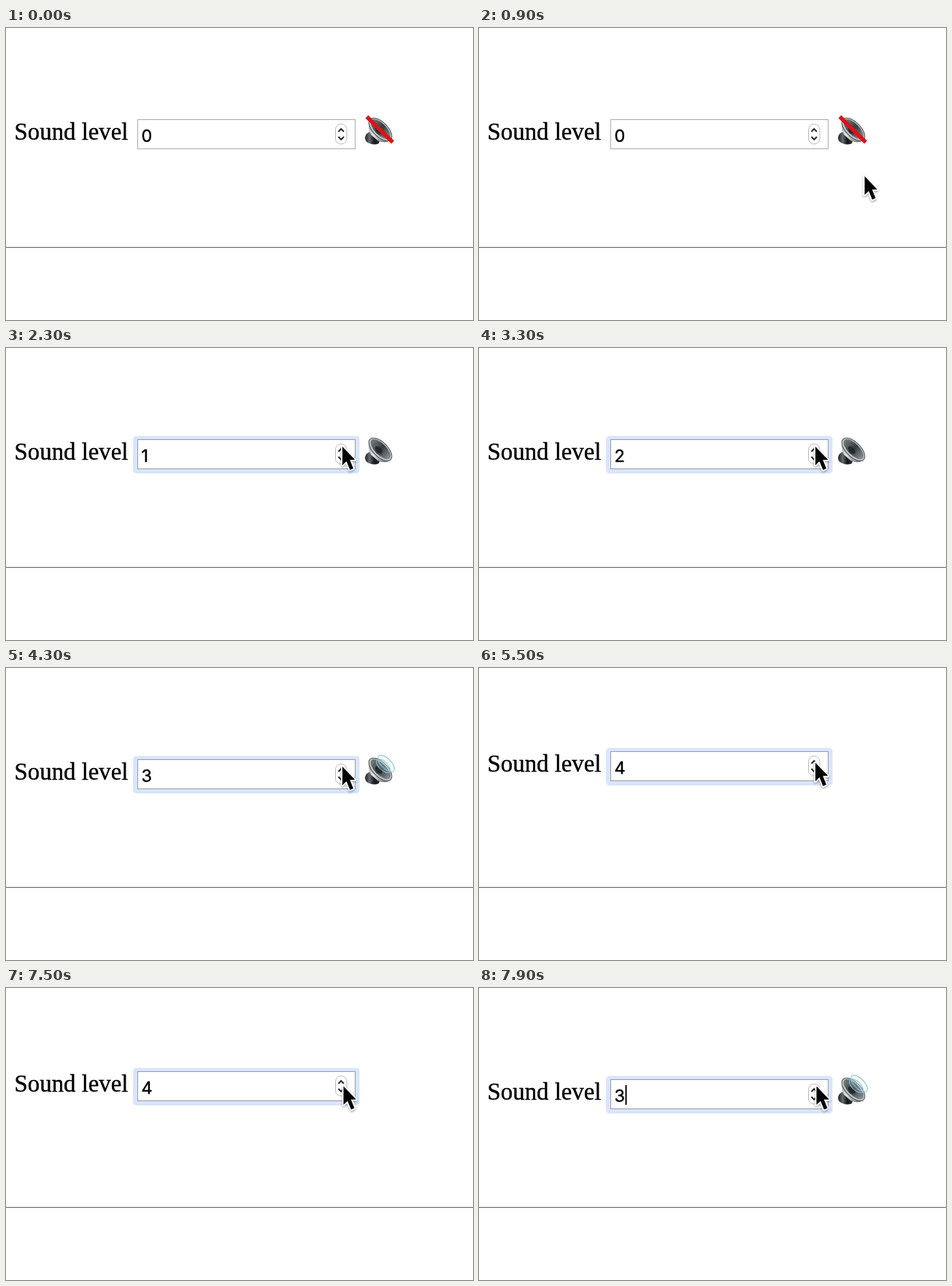
Write an HTML page that moves like this. It is 640x400 px and loops after 8000 ms.

```html
<!DOCTYPE html>
<html lang="en">
<head>
<meta charset="utf-8">
<title>Sound level</title>
<style>
  html, body { margin: 0; width: 100%; height: 100%; overflow: hidden; background: #fff; }
  svg { display: block; width: 640px; height: 400px; }
  text { stroke: #000; stroke-width: .4px; }
  .label { font: 32.8px "Liberation Serif", serif; }
  .digit { font: 23.5px Inter, sans-serif; }
</style>
</head>
<body>
<svg viewBox="0 0 640 400">
  <defs>
    <linearGradient id="metal" x1="0" y1="0" x2="1" y2="1">
      <stop offset="0" stop-color="#777"/>
      <stop offset=".45" stop-color="#e4e7e8"/>
      <stop offset="1" stop-color="#555a5d"/>
    </linearGradient>
    <linearGradient id="inside" x1="0" y1="0" x2="1" y2="0">
      <stop offset="0" stop-color="#777d80"/>
      <stop offset=".5" stop-color="#363a3d"/>
      <stop offset="1" stop-color="#8b9194"/>
    </linearGradient>
    <linearGradient id="magnet">
      <stop offset="0" stop-color="#222"/>
      <stop offset=".3" stop-color="#666b6e"/>
      <stop offset=".6" stop-color="#15181a"/>
      <stop offset="1" stop-color="#333"/>
    </linearGradient>
    <filter id="shadow" x="-50%" y="-50%" width="200%" height="200%">
      <feDropShadow dx="0" dy="1.5" stdDeviation="1.5" flood-opacity=".4"/>
    </filter>
  </defs>

  <path d="M0 300.5H640" stroke="#5c5c5c"/>

  <g id="form">
    <text class="label" x="11.6" y="153.4">Sound level</text>
    <rect id="ring" x="174" y="120.5" width="310.5" height="51.5" rx="5" fill="#dae5fb"/>
    <rect id="field" x="180.5" y="125.5" width="298" height="40" fill="#fff"/>
    <text class="digit" id="digit" x="185.5" y="156"></text>
    <rect id="caret" y="133" width="2" height="27"/>
    <rect x="451.5" y="131.5" width="15.5" height="27.5" rx="7.7" fill="#fff" stroke="#b8b8b8"/>
    <path d="M455.5 142 459.2 138.2 463 142M455.5 149 459.2 152.8 463 149"
          fill="none" stroke="#2b2b2b" stroke-width="2"/>

    <g id="speaker">
      <path d="M494 145Q499 140 504 143L513 152 511 158Q504 162 494 156Q490 151 494 145Z" fill="url(#magnet)"/>
      <path d="M499 125Q495 138 500 146L509 154Q519 159 526 154Z" fill="url(#metal)"/>
      <g transform="rotate(45 513 139)">
        <ellipse cx="513" cy="139" rx="20" ry="10" fill="#b9bec0" stroke="#555b5e"/>
        <ellipse cx="513" cy="138.5" rx="17.5" ry="7.8" fill="url(#inside)"/>
        <ellipse cx="512" cy="141" rx="6" ry="3.5" fill="#24282a"/>
      </g>
    </g>
    <path id="mute" d="M494.5 121.5 530 156.5" stroke="#df1118" stroke-width="5.5"/>
    <g id="waves" fill="#bfe6ee" fill-opacity=".22" stroke="#83bccb" stroke-width="1">
      <ellipse cx="517" cy="134" rx="12" ry="6" transform="rotate(45 517 134)"/>
      <ellipse cx="521" cy="131" rx="14.5" ry="7" transform="rotate(45 521 131)"/>
    </g>
  </g>

  <path id="pointer" d="M0 0V25.5L5.6 20.2 10.4 32 15 30 10.2 18.2H17.4Z"
        stroke="#fff" stroke-width="3.4" stroke-linejoin="round" paint-order="stroke" filter="url(#shadow)"/>
</svg>

<script>
const LOOP = 8000, BLINK = 500, FOCUS = 1800;
// [time, value]
const levels = [[0, 0], [FOCUS, 1], [2800, 2], [3800, 3], [4700, 4], [5700, 5], [7000, 4], [7800, 3]];
// [time, x, y]
const path = [
  [600, 583, 262], [800, 551, 225], [1000, 506, 181], [1200, 473, 150], [1400, 464, 141],
  [1500, 463, 138], [1700, 461, 135], [5300, 461, 135], [5400, 461, 130], [5700, 461, 129],
  [6000, 462.5, 134.5], [LOOP, 462.5, 134.5]
];

const el = id => document.getElementById(id);
const show = (id, on) => el(id).setAttribute("display", on ? "inline" : "none");
const move = (id, x, y) => el(id).setAttribute("transform", `translate(${x} ${y})`);

function pointerAt(t) {
  const i = Math.max(1, path.findIndex(p => p[0] > t));
  const [t0, x0, y0] = path[i - 1], [t1, x1, y1] = path[i];
  const k = Math.max(0, (t - t0) / (t1 - t0));
  return [x0 + (x1 - x0) * k, y0 + (y1 - y0) * k];
}

function draw(t) {
  const [since, level] = levels.filter(l => l[0] <= t).pop();
  const focused = t >= FOCUS, hasIcon = level < 4;

  move("form", 0, hasIcon ? 0 : -11);
  el("digit").textContent = level;
  el("field").setAttribute("stroke", focused ? "#929cad" : "#ababab");
  el("caret").setAttribute("x", level === 1 ? 197 : 200.5);
  show("ring", focused);
  show("caret", focused && (t - since) % (2 * BLINK) < BLINK);
  show("speaker", hasIcon);
  show("mute", level === 0);
  show("waves", level === 3);

  show("pointer", t >= path[0][0]);
  // The pointer is sampled ten times a second.
  move("pointer", ...pointerAt(Math.floor(t / 100) * 100));
}

const start = performance.now();
function tick() {
  draw((performance.now() - start) % LOOP);
  requestAnimationFrame(tick);
}
tick();
</script>
</body>
</html>
```
